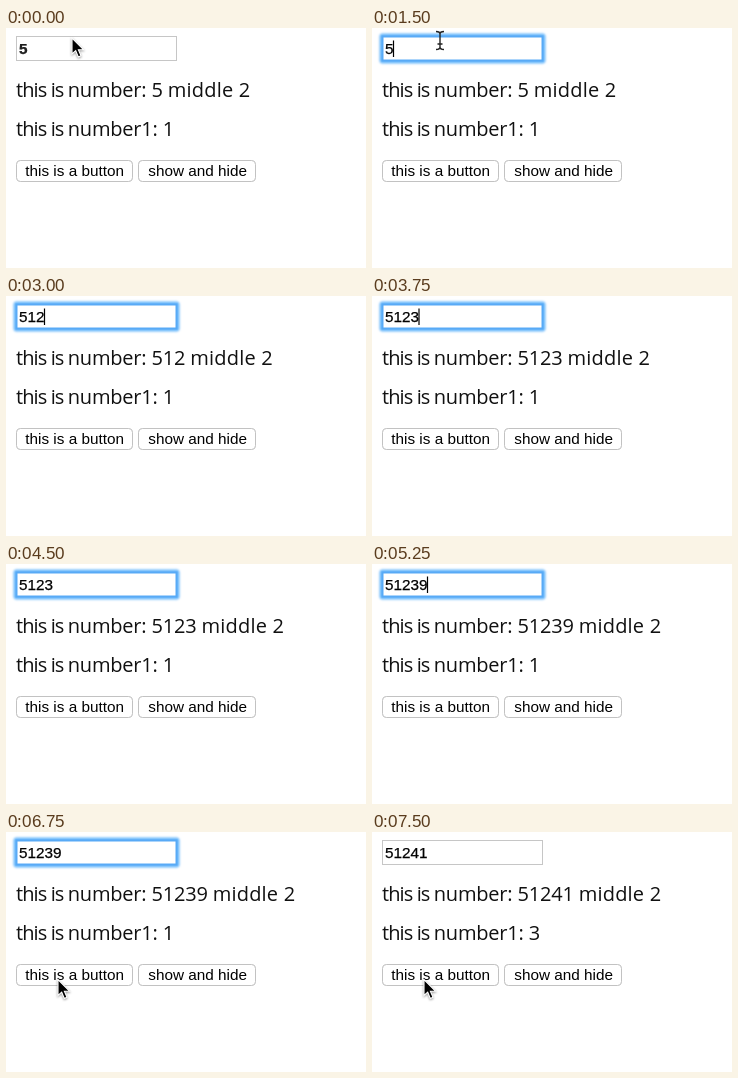
Animation of 360 by 240 pixels, one loop 8000 ms. Source, as an HTML page:

```html
<!DOCTYPE html>
<html lang="en">
<head>
<meta charset="utf-8">
<title>Linked number field</title>
<style>
  html, body { margin: 0; width: 100%; height: 100%; overflow: hidden; background: #fff; }
  svg { display: block; width: 360px; height: 240px; }
  .ui { font: 15.3px "Liberation Sans", Arial, sans-serif; fill: #000; }
  #value { stroke: #000; stroke-width: .25; }
  .bold { font-weight: bold; fill: #222; }
  .line { font: 20px "Open Sans", sans-serif; letter-spacing: -.2px; fill: #111; }
  .tight { letter-spacing: -.9px; }
  .wide { letter-spacing: .2px; }
  .button { fill: #fff; stroke: #c2c2c2; filter: drop-shadow(0 .6px .4px #0003); }
  .field { fill: #fff; stroke: #c6c6c6; }
  .focused { stroke: #58aaf6; stroke-width: 2; }
  #arrow { filter: drop-shadow(0 1.2px 1px #0006); }
  .hidden { visibility: hidden; }
</style>
</head>
<body>
<svg viewBox="0 0 360 240">
  <defs>
    <filter id="soft" x="-10%" y="-40%" width="120%" height="180%">
      <feGaussianBlur stdDeviation="1"/>
    </filter>
  </defs>

  <rect id="ring" x="7.5" y="5.5" width="166" height="30" rx="3" fill="#6cb9fb" filter="url(#soft)"/>
  <rect id="field" class="field" x="10.5" y="8.5" width="160" height="24"/>
  <text id="value" class="ui" x="13" y="25.5">5</text>
  <rect id="caret" y="12.5" width="1.2" height="16.5"/>

  <text class="line" x="10" y="69"><tspan class="tight">this is </tspan>number: <tspan id="number">5</tspan> <tspan class="wide">middle </tspan>2</text>
  <text class="line" x="10" y="108"><tspan class="tight">this is </tspan>number1: <tspan id="count">1</tspan></text>

  <rect class="button" x="10.5" y="132.5" width="116" height="21" rx="4"/>
  <text class="ui" x="19.3" y="148">this is a button</text>
  <rect class="button" x="132.5" y="132.5" width="117" height="21" rx="4"/>
  <text class="ui" x="142.3" y="148">show and hide</text>

  <path id="arrow" d="M0 0V16L3.7 12.7 6.3 19 9 17.8 6.4 11.7H11.5Z" fill="#000" stroke="#fff" stroke-width="1.1"/>
  <path id="beam" d="M-4-9Q0-9 0-6.5Q0-9 4-9M0-6.5V6.5M-4 9Q0 9 0 6.5Q0 9 4 9M-2.5 3.5H2.5" fill="none" stroke="#222" stroke-width="1.4"/>
</svg>
<script>
  const LOOP = 8000;
  const DIGIT = 8.5;
  const $ = id => document.getElementById(id);

  // Each step overrides the state left by the previous ones.
  const steps = [
    { at: 0, value: "5", bold: true, count: 1, focus: false, caret: false, arrow: [66, 10], beam: null },
    { at: 1500, bold: false, focus: true, caret: true, arrow: null, beam: [68, 12.5] },
    { at: 2250, caret: false },
    { at: 3000, value: "512", caret: true, beam: null },
    { at: 3750, value: "5123" },
    { at: 4500, caret: false },
    { at: 5250, value: "51239", caret: true },
    { at: 6000, caret: false, beam: [104, 104.5] },
    { at: 6750, beam: null, arrow: [52, 147.5] },
    { at: 7500, value: "51241", count: 3, focus: false }
  ];

  const show = (id, on) => $(id).classList.toggle("hidden", !on);

  function place(id, pos) {
    show(id, pos);
    if (pos) $(id).setAttribute("transform", `translate(${pos})`);
  }

  function render(time) {
    const state = Object.assign({}, ...steps.filter(step => step.at <= time));
    $("value").textContent = $("number").textContent = state.value;
    $("value").classList.toggle("bold", state.bold);
    $("count").textContent = state.count;
    $("caret").setAttribute("x", 12.4 + DIGIT * state.value.length);
    $("field").classList.toggle("focused", state.focus);
    show("ring", state.focus);
    show("caret", state.caret);
    place("arrow", state.arrow);
    place("beam", state.beam);
  }

  const start = performance.now();
  function tick() {
    render((performance.now() - start) % LOOP);
    requestAnimationFrame(tick);
  }
  tick();
</script>
</body>
</html>
```
